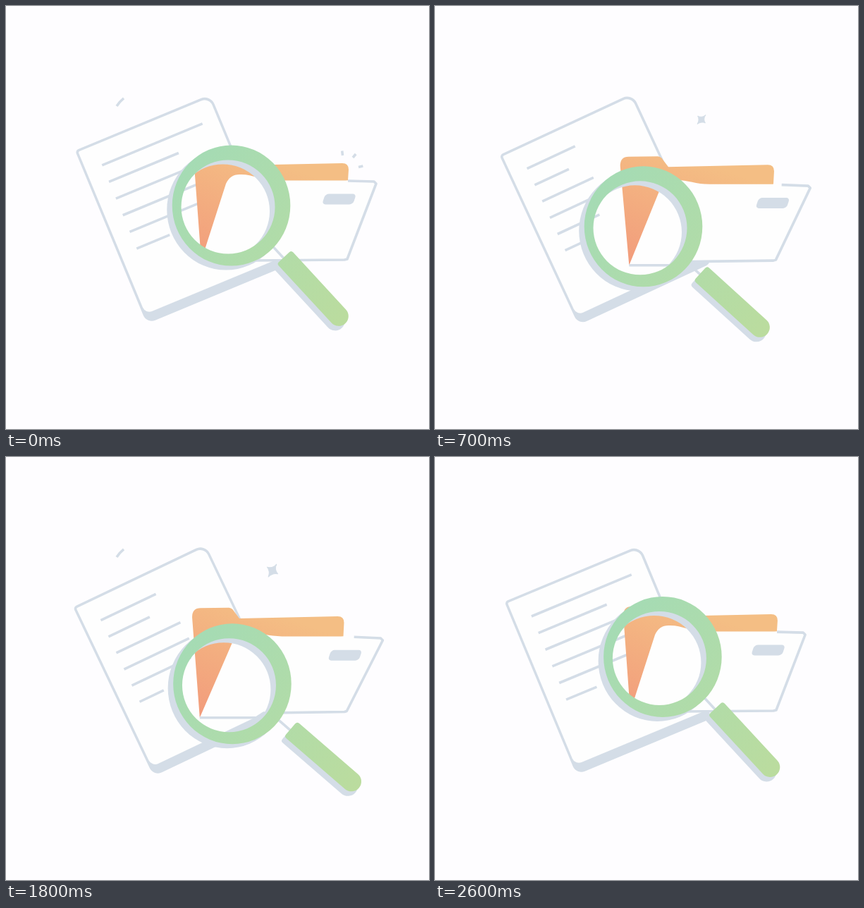
Animation, 600 px wide and 600 px high, one loop 2700 ms. Source, as an HTML page with a canvas:

```html
<!DOCTYPE html>
<html lang="en">
<head>
<meta charset="utf-8">
<title>Searching files</title>
<style>
  html, body { margin: 0; width: 100%; height: 100%; overflow: hidden; background: #fefdff; }
  canvas { display: block; }
</style>
</head>
<body>
<canvas id="stage" width="600" height="600"></canvas>
<script>
const ctx = document.getElementById('stage').getContext('2d');
const LOOP = 2700, STEP = 100;
const GREY = '#d4dde7', PAPER = '#fefefe', BACK = '#fefdff';
const TAU = Math.PI * 2, DEG = Math.PI / 180;

const mix = (a, b, k) => a + (b - a) * k;
const wave = (t, period, delay) => Math.cos(TAU * (t - delay) / period);

// Piecewise linear value through evenly spaced stops
function track(stops, pos) {
  const i = Math.max(0, Math.min(stops.length - 2, Math.floor(pos)));
  return mix(stops[i], stops[i + 1], Math.min(1, pos - i));
}

function at(x, y, angle, draw) {
  ctx.save();
  ctx.translate(x, y);
  ctx.rotate(angle * DEG);
  draw();
  ctx.restore();
}

function line(...p) {
  ctx.beginPath();
  for (let i = 0; i < p.length; i += 2) ctx.lineTo(p[i], p[i + 1]);
  ctx.stroke();
}

function box(x, y, w, h, radii, fill) {
  ctx.beginPath();
  ctx.roundRect(x, y, w, h, radii);
  ctx.fillStyle = fill;
  ctx.fill();
}

function gradient(x0, y0, x1, y1, from, to) {
  const g = ctx.createLinearGradient(x0, y0, x1, y1);
  g.addColorStop(0, from);
  g.addColorStop(1, to);
  return g;
}

function drawPage(t, k) {
  const x = 96.3 - 4.5 * wave(t, LOOP, 1060), tilt = k ** 0.75;
  at(x, 205.7 + 10 * tilt, -22.5 - 3.8 * tilt, () => {
    box(-1.5, -1.5, 208, 266, [5, 15, 8, 13], GREY);
    box(2, 2, 201, 249, [2, 12, 5, 10], PAPER);
    const lines = [[114, 41], [80, 27], [118, 38], [115, 38], [100, 35], [39, 13]];
    lines.forEach(([mean, swing], i) => {
      const y = 32.5 + 25.6 * i;
      line(26, y, 26 + mean + swing * wave(t, LOOP / 2, 28 * i - 45), y);
    });
  });
}

function drawSwirl(t) {
  const p = t % 900 / 100;
  if (p > 4) return;
  const start = track([0, 0, 25, 60, 86], p), end = track([12, 51, 85, 100, 100], p);
  const length = 124, unit = length / 100;
  ctx.setLineDash([0, start * unit, (end - start) * unit, 2 * length]);
  ctx.stroke(new Path2D('M157 142C165 130 174 125 182 126C196 128 205 140 196 144C184 149 174 126 184 109C188 103 193 99 198 97'));
  ctx.setLineDash([]);
}

function drawStar(age) {
  if (age < 0 || age > 1050) return;
  const size = age / 1000 * 0.88 + 0.12;
  const angle = track([70, 52, 33, 13, -11, 0], age / 200);
  const star = new Path2D('M0-23Q2-5 19 0Q4 5 0 23Q-4 5-19 0Q-2-5 0-23');
  at(378, 161, angle, () => {
    ctx.globalAlpha = age > 800 ? Math.max(0, 1 - (age - 800) / 310) : 1;
    ctx.scale(size, size);
    ctx.lineWidth = 2;
    ctx.fillStyle = GREY;
    ctx.fill(star);
    ctx.stroke(star);
  });
}

function drawTicks(t) {
  const p = t % 1400 / 300;
  if (p >= 1) return;
  [[477.5, 212, -97], [492, 215, -50], [500, 228.5, -13]].forEach(([x, y, angle]) =>
    at(x, y, angle, () => line(6 * p, 0, 6.5, 0)));
}

function drawFolder(t, k) {
  const left = 264.2 - 3 * wave(t, LOOP, 1150), top = 212 + 3 * k, bar = 226 + 4 * k;
  const right = 486 - 9 * k, rim = 247.5 + 9.5 * k;
  const cornerX = 525 + 13 * k, cornerY = 250 + 11 * k;
  const px = 317 + 13 * k, py = 239 + 14 * k;
  const tipX = 277 - 3 * k, tipY = 361 + 12 * k;
  const kink = 347 + 25 * k, low = 361 + 3 * k;

  ctx.beginPath();
  ctx.moveTo(tipX, tipY);
  ctx.lineTo(left, top + 13);
  ctx.quadraticCurveTo(left, top, left + 12, top);
  ctx.lineTo(316, top - 0.5);
  ctx.quadraticCurveTo(321, top, 323, top + 4);
  ctx.lineTo(331, bar);
  ctx.lineTo(right - 9, bar - 3);
  ctx.quadraticCurveTo(right, bar - 3, right, bar + 6);
  ctx.lineTo(right - 1, rim);
  ctx.lineTo(px + 20, rim + 20);
  ctx.fillStyle = gradient(340, 205, 275, 375, '#f4be84', '#f29a7b');
  ctx.fill();

  ctx.beginPath();
  ctx.moveTo(tipX, tipY);
  ctx.lineTo(px - 5, py + 13);
  ctx.quadraticCurveTo(px + 1, py, px + 14, py);
  ctx.bezierCurveTo(px + 32, py - 1, px + 45, rim, px + 65, rim);
  ctx.lineTo(right, rim);
  ctx.lineTo(cornerX, cornerY);
  ctx.lineTo(483, 360 + k);
  ctx.lineTo(kink, low);
  ctx.lineTo(kink - 10, tipY);
  ctx.fillStyle = PAPER;
  ctx.fill();
  line(485 + 12 * k, 248 + 10 * k, cornerX - 3, cornerY - 1, cornerX, cornerY + 2,
    484 - k, 359 + 2 * k, 480, 360 + 2 * k, kink, low, kink - 10, tipY, tipX, tipY);

  at(472.5 + 11.5 * k, 274 + 10 * k, 0, () => {
    ctx.transform(1, 0, -0.33, 1, 0, 0);
    box(-22, -7.5, 44, 15, 5, GREY);
  });
}

function drawLens(t, k) {
  const x = 311.5 + 17.5 * wave(t, LOOP, 2230), y = 283 + 53.5 * k;
  const angle = 47.3 - 9 * k;
  const green = gradient(-85, -50, 170, 160, '#a4dbb5', '#bbdc9e');

  const ring = color => {
    ctx.beginPath();
    ctx.ellipse(0, 0, 83.8, 85.5, 0, 0, TAU);
    ctx.moveTo(62, 2);
    ctx.arc(-4.5, 2, 66.5, 0, TAU, true);
    ctx.fillStyle = color;
    ctx.fill('evenodd');
  };
  const handle = color => {
    const path = new Path2D(), shape = new Path2D();
    shape.roundRect(104.5, -19.5, 128, 28, [4, 14, 14, 4]);
    path.addPath(shape, new DOMMatrix().rotate(angle));
    ctx.fillStyle = color;
    ctx.fill(path);
  };

  at(x, y, angle, () => line(80, -4, 108, -4));
  at(x - 7.5, y + 6, 0, () => ring(GREY));
  at(x - 5, y + 6.5, 0, () => handle(GREY));
  at(x, y, 0, () => { ring(green); handle(green); });
}

function draw(now) {
  const t = Math.floor(now % LOOP / STEP) * STEP;
  const k = (1 - wave(t, LOOP, -25)) / 2;
  ctx.fillStyle = BACK;
  ctx.fillRect(0, 0, 600, 600);
  ctx.strokeStyle = GREY;
  ctx.lineWidth = 3.6;
  ctx.lineJoin = 'round';
  drawPage(t, k);
  drawSwirl(t);
  drawStar(t - 400);
  drawStar(t - 1400);
  drawTicks(t);
  drawFolder(t, k);
  drawLens(t, k);
}

const begin = performance.now();
function frame() {
  draw(performance.now() - begin);
  requestAnimationFrame(frame);
}
frame();
</script>
</body>
</html>
```
